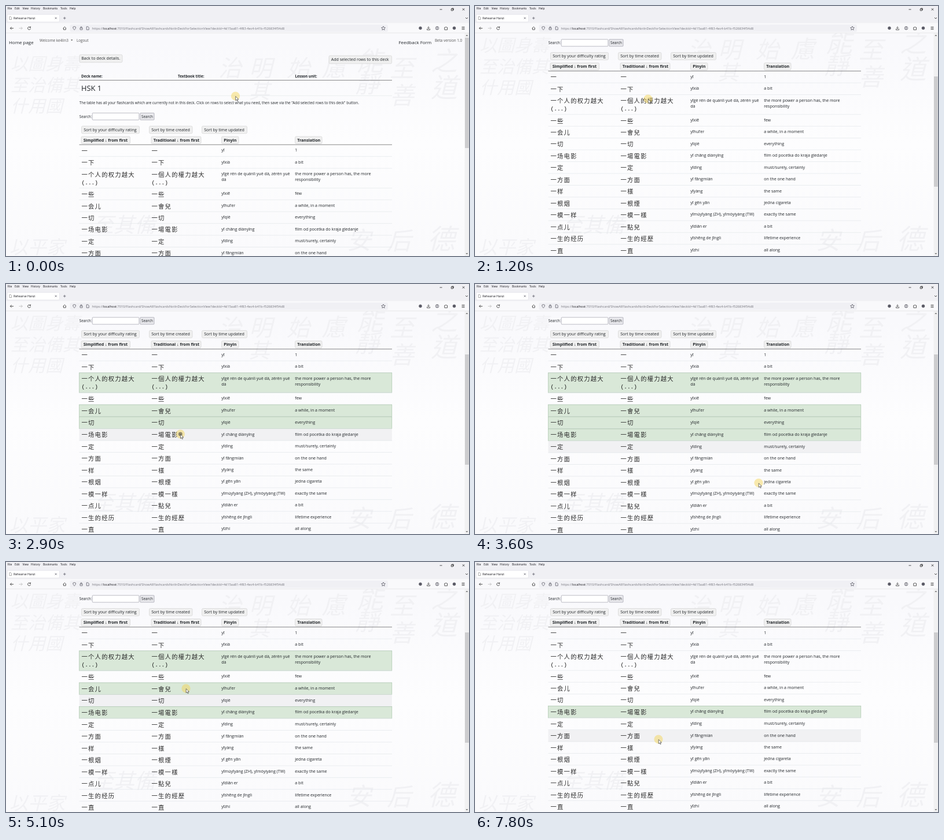
These frames come from a looping animation (800x433 px, 7.9 s). An HTML page:

```html
<!DOCTYPE html>
<html lang="en">
<head>
<meta charset="utf-8">
<title>Flashcard selection</title>
<style>
  html, body { margin: 0; width: 100%; height: 100%; overflow: hidden; }
  svg { display: block; width: 100vw; height: 100vh; background: linear-gradient(#f9f9fc 15%, #fdfdfe 55%, #fafafc); }
  text { font-family: "Open Sans", "Noto Sans", sans-serif; font-size: 7.1px; fill: #212529; white-space: pre; }
  .small { font-size: 6.32px; }
  .bold { font-weight: 700; }
  .menu { font-size: 4.8px; fill: #15141a; }
  .url { font-size: 5.57px; fill: #74747c; }
  .han { font-family: "Noto Sans CJK SC", sans-serif; font-size: 10.3px; font-weight: 300; letter-spacing: 1.25px; fill: #2a2a2a; }
  .dots { font-family: "Liberation Mono", monospace; font-size: 9.5px; fill: #111; }
  .brush { font-family: "Noto Sans CJK TC", sans-serif; font-weight: 400; font-style: italic; fill: #f1f1f4; }
  .icon { fill: none; stroke: #5b5b66; stroke-width: .8; }
</style>
</head>
<body>
<script>
const LOOP = 7900, STEP = 100, SCROLL = 127.5;

function el(parent, tag, attrs = {}, content) {
  const node = document.createElementNS('http://www.w3.org/2000/svg', tag);
  for (const key in attrs) node.setAttribute(key, attrs[key]);
  if (content) node.textContent = content;
  parent.append(node);
  return node;
}
const text = (parent, x, y, content, cls = '', style = '') =>
  el(parent, 'text', { x, y, class: cls, style }, content);
const box = (parent, x, y, width, height, fill, stroke = 'none', rx = 0) =>
  el(parent, 'rect', { x, y, width, height, fill, stroke, rx, 'stroke-width': .6 });
const rule = (parent, y, stroke = '#dee2e6', width = .6) =>
  el(parent, 'path', { d: `M126.5 ${y}H667`, stroke, 'stroke-width': width });
const icon = (parent, d, stroke = '#5b5b66') => el(parent, 'path', { d, class: 'icon', style: `stroke:${stroke}` });
function button(parent, x, y, right, height, label, cls = '', pad = 3.7) {
  box(parent, x, y, right - x, height, '#f0f0f0', '#cfcfcf', 2);
  text(parent, x + pad, y + height / 2 + 2.4, label, cls);
}

const svg = el(document.body, 'svg', { viewBox: '0 0 800 433' });

// Faint calligraphy behind the page
const brushTop = el(svg, 'g'), brushBottom = el(svg, 'g');
[['治', 367, 122, 40], ['明', 420, 122, 40], ['其', 420, 160, 36], ['始', 485, 122, 40], ['慮', 545, 122, 42],
 ['能', 606, 112, 46], ['靜', 603, 150, 42], ['至', 663, 123, 42], ['善', 663, 170, 42], ['之', 734, 112, 46], ['道', 734, 158, 46],
 ['以圖身壽', 8, 111, 30], ['至治備其', 8, 148, 30], ['什用國', 8, 184, 30]
].forEach(([s, x, y, size]) => text(brushTop, x, y, s, 'brush', `font-size:${size}px`));
[['安', 589, 421, 42], ['后', 658, 422, 42], ['德', 728, 421, 48], ['以平家', 6, 429, 32], ['至其備', 150, 392, 36]
].forEach(([s, x, y, size]) => text(brushBottom, x, y, s, 'brush', `font-size:${size}px`));

const page = el(svg, 'g');
text(page, 5, 66, 'Home page', '', 'font-size:7.95px');
text(page, 58, 61.8, 'Welcome ke4lin3', 'small', 'fill:#555');
el(page, 'path', { d: 'M112 58.3h3.4l-1.7 1.9z', fill: '#555' });
text(page, 122, 62, 'Logout', 'small', 'fill:#555');
text(page, 678.5, 66, 'Feedback Form', '', 'font-size:7.95px');
text(page, 741, 61.8, 'Beta version 1.0', 'small', 'fill:#555');
button(page, 127, 84.3, 201, 13.4, 'Back to deck details.', '', 3.2);
button(page, 558, 86, 666.5, 13.8, 'Add selected rows to this deck');
[[130, 'Deck name:'], [297, 'Textbook title:'], [499.5, 'Lesson unit:']]
  .forEach(([x, s]) => text(page, x, 123.6, s, 'small bold'));
rule(page, 128.6, '#555', .7);
text(page, 130, 146.5, 'HSK 1', '', 'font-size:12.8px');
rule(page, 155.3);
text(page, 126.8, 170, 'The table has all your flashcards which are currently not in this deck. Click on rows to select what you need, then save via the "Add selected rows to this deck" button.', 'small');
text(page, 126.8, 193.6, 'Search:', 'small');
box(page, 149.2, 185.3, 80.6, 12, '#fff', '#8f8f9d', 1);
box(page, 231.8, 185.3, 24.2, 12, '#e9e9ed', '#8f8f9d', 1);
text(page, 234, 193.6, 'Search', 'small');
[[130.5, 230.5, 'Sort by your difficulty rating'], [247.5, 322, 'Sort by time created'], [338.5, 416.5, 'Sort by time updated']]
  .forEach(([x, right, s]) => button(page, x, 208, right, 12.8, s));
[[130, 214.5, 'Simplified ↓ from first'], [251, 337, 'Traditional ↓ from first'], [372.5, 402, 'Pinyin'], [499.5, 546, 'Translation']]
  .forEach(([x, right, s]) => button(page, x, 226, right, 12.6, s, 'bold'));
rule(page, 240.2, '#555', .7);

// Simplified | traditional | pinyin | translation; "/" breaks a line, "_" is a slash
const rows = `一|一|yī|1
一下|一下|yīxià|a bit
一个人的权力越大/(...)|一個人的權力越大/(...)|yīgè rén de quánlì yuè dà, zérèn yuè/dà|the more power a person has, the more/responsibility
一些|一些|yīxiē|few
一会儿|一會兒|yīhuǐ'er|a while, in a moment
一切|一切|yīqiè|everything
一场电影|一場電影|yī chǎng diànyǐng|film od pocetka do kraja gledanje
一定|一定|yīdìng|must_surely, certainly
一方面|一方面|yī fāngmiàn|on the one hand
一样|一樣|yīyàng|the same
一根烟|一根煙|yī gēn yān|jedna cigareta
一模一样|一模一樣|yīmúyīyàng (ZH), yīmóyíyàng (TW)|exactly the same
一点儿|一點兒|yīdiǎn er|a bit
一生的经历|一生的經歷|yīshēng de jīnglì|lifetime experience
一直|一直|yīzhí|all along`.split('\n').map(line => {
  const group = el(page, 'g'), height = line.includes('(...)') ? 34.2 : 20.45;
  const back = box(group, 126.5, .3, 540.3, height, 'none');
  rule(group, height);
  line.split('|').forEach((cell, col) => cell.split('/').forEach((part, n) => {
    const x = [130.5, 251.5, 372.2, 499.3][col];
    if (col > 1) text(group, x, 12 + n * 10.2, part.replace('_', '/'));
    else text(group, x, n ? 27.6 : 14.8, part, n ? 'dots' : 'han');
  }));
  return { group, back, height };
});

// Scrollbar
box(svg, 792.5, 47, 7.5, 386, '#f1f1f2');
const thumb = box(svg, 793, 55, 6.7, 191, '#cdcdcf');
el(svg, 'path', { d: 'M794.3 52l2-2.3 2 2.3zM794.3 428l2 2.3 2-2.3z', fill: '#777' });

// Browser frame
const chrome = el(svg, 'g');
box(chrome, 0, 0, 800, 30, '#f0f0f4');
box(chrome, 0, 29.5, 800, 17.5, '#f9f9fb');
box(chrome, 0, 46.6, 800, .5, '#d4d4d8');
[[2.5, 'File'], [15, 'Edit'], [28.5, 'View'], [43, 'History'], [64, 'Bookmarks'], [94, 'Tools'], [110, 'Help']]
  .forEach(([x, s]) => text(chrome, x, 6, s, 'menu'));
icon(chrome, 'M749.5 6h4M769.3 5h3v3h-3zM770.3 5v-1h3v3h-1M788.8 4.2l3.4 3.4m0-3.4l-3.4 3.4M794 20l2 2 2-2', '#222');
box(chrome, 2, 14.5, 90.5, 13.2, '#fff', '#dcdce2', 2);
icon(chrome, 'M6 18.5h2.4l1.2 1.2v3.8H6z', '#999');
text(chrome, 13, 23, 'Rehearse Hanzi', 'menu', 'font-size:5.2px');
icon(chrome, 'M84.8 19.6l2.8 2.8m0-2.8l-2.8 2.8M99 21h4.4M101.2 18.8v4.4');
icon(chrome, 'M13 38.5H7.3m2.4-2.4l-2.4 2.4 2.4 2.4M42 37a2.5 2.5 0 1 0 .5 2m0-3.6v2h-2M98.6 38.6l2.7-2.6 2.7 2.6M99.4 38v3h3.8v-3', '#333');
icon(chrome, 'M22.5 38.5h5.7m-2.4-2.4l2.4 2.4-2.4 2.4', '#bbb');
box(chrome, 110.5, 32.3, 549.5, 12.4, '#f0f0f4', 'none', 2);
icon(chrome, 'M115.8 36.3l2.3-.8 2.3.8c0 2.8-.8 4-2.3 5-1.5-1-2.3-2.2-2.3-5zM128 38h4v3h-4zM128.8 38v-1a1.2 1.2 0 0 1 2.4 0v1M139.2 35.8h2.6l1.4 1.4v3.9h-4z');
const url = text(chrome, 148.8, 40.5, '', 'url');
['https://', 'localhost', ':7010/Flashcard/ShowAllFlashcardsNotInDeckForSelectionView?deckId=4d15aa81-4f83-4ec4-b41b-f526834f54d8']
  .forEach((s, i) => el(url, 'tspan', i == 1 ? { fill: '#15141a' } : {}, s));
icon(chrome, 'M652 35l1 2.2 2.4.3-1.8 1.6.5 2.4-2.1-1.2-2.1 1.2.5-2.4-1.8-1.6 2.4-.3z');
el(chrome, 'circle', { cx: 716, cy: 38.3, r: 2.7, fill: '#5b5b66' });
icon(chrome, 'M730 35.3v4m-1.8-1.7l1.8 1.8 1.8-1.8M727.5 39.5v1.8h5v-1.8M757.8 37h1.5a1 1 0 0 1 1.9 0h1.3v4.2h-4.7zM787.5 36.3h5M787.5 38.4h5M787.5 40.5h5', '#333');
el(chrome, 'circle', { cx: 745, cy: 38.3, r: 2.8, class: 'icon' });
icon(chrome, 'M743.2 40.2q1.8-1.8 3.6 0M744.2 37.2a.8.8 0 1 0 1.6 0a.8.8 0 1 0-1.6 0');
el(chrome, 'circle', { cx: 774.5, cy: 38.3, r: 2.7, fill: '#5b5b66' });

// Pointer with its highlight
const pointer = el(svg, 'g');
el(pointer, 'circle', { r: 7.6, fill: '#f5d34c', opacity: .45 });
const press = el(pointer, 'circle', { r: 3.4, fill: '#77705a', opacity: .8 });
el(pointer, 'path', { d: 'M.2.5v7.2l1.7-1.5 1.2 2.6 1.2-.6-1.2-2.5h2.3z', fill: '#fff', stroke: '#222', 'stroke-width': .6 });

const pathKeys = [[0, 396.5, 156], [500, 407, 157.5], [800, 407, 157.5], [1200, 299, 161], [1600, 298, 164], [2000, 291, 218],
  [2300, 288, 247.5], [2800, 296, 258], [3200, 330, 270], [3600, 490, 344.5], [3900, 318, 299], [4300, 312, 240],
  [4800, 311, 237], [5100, 311, 219], [5500, 314, 163], [6000, 314, 163], [6500, 314, 265], [7100, 317, 307], [LOOP, 317, 307]];
const clicks = [1300, 2100, 2300, 2900, 4300, 5200, 5600];
// Times when a row is selected, and released if ever
const picks = { 2: [1500, 5800], 4: [2400, 5300], 5: [2800, 4500], 6: [3200, LOOP] };
const hovers = [[0, -1], [1400, 2], [1900, 4], [2500, 5], [2900, 6], [3400, 7], [3700, 10], [3900, 8], [4100, 7],
  [4400, 5], [5200, 4], [5500, 2], [6600, 6], [6900, 8]];

const ease = p => p * p * (3 - 2 * p);
const ramp = (t, from, to) => ease(Math.min(1, Math.max(0, (t - from) / (to - from))));

function draw(t) {
  const scrolled = ramp(t, 800, 1150);
  page.setAttribute('transform', `translate(0 ${-SCROLL * scrolled})`);
  brushTop.setAttribute('transform', `translate(0 ${-32 * scrolled})`);
  thumb.setAttribute('y', 55 + 67 * scrolled);

  const hovered = hovers.filter(h => h[0] <= t).pop()[1];
  let y = 240.2;
  rows.forEach((row, i) => {
    const selected = picks[i] && t >= picks[i][0] && t < picks[i][1];
    row.group.setAttribute('transform', `translate(0 ${y})`);
    row.back.setAttribute('fill', selected ? '#d9e8d8' : i == hovered ? '#f1f1f3' : 'none');
    row.back.setAttribute('stroke', selected ? '#a3bfa5' : 'none');
    y += row.height + (selected ? .5 : 0);
  });

  const next = pathKeys.findIndex(k => k[0] > t), [t0, x0, y0] = pathKeys[next - 1], [t1, x1, y1] = pathKeys[next];
  const p = ramp(t, t0, t1);
  pointer.setAttribute('transform', `translate(${x0 + (x1 - x0) * p} ${y0 + (y1 - y0) * p})`);
  press.setAttribute('visibility', clicks.some(c => t >= c && t < c + STEP) ? 'visible' : 'hidden');
}

function tick() {
  draw(Math.floor(performance.now() % LOOP / STEP) * STEP);
  requestAnimationFrame(tick);
}
tick();
</script>
</body>
</html>
```
